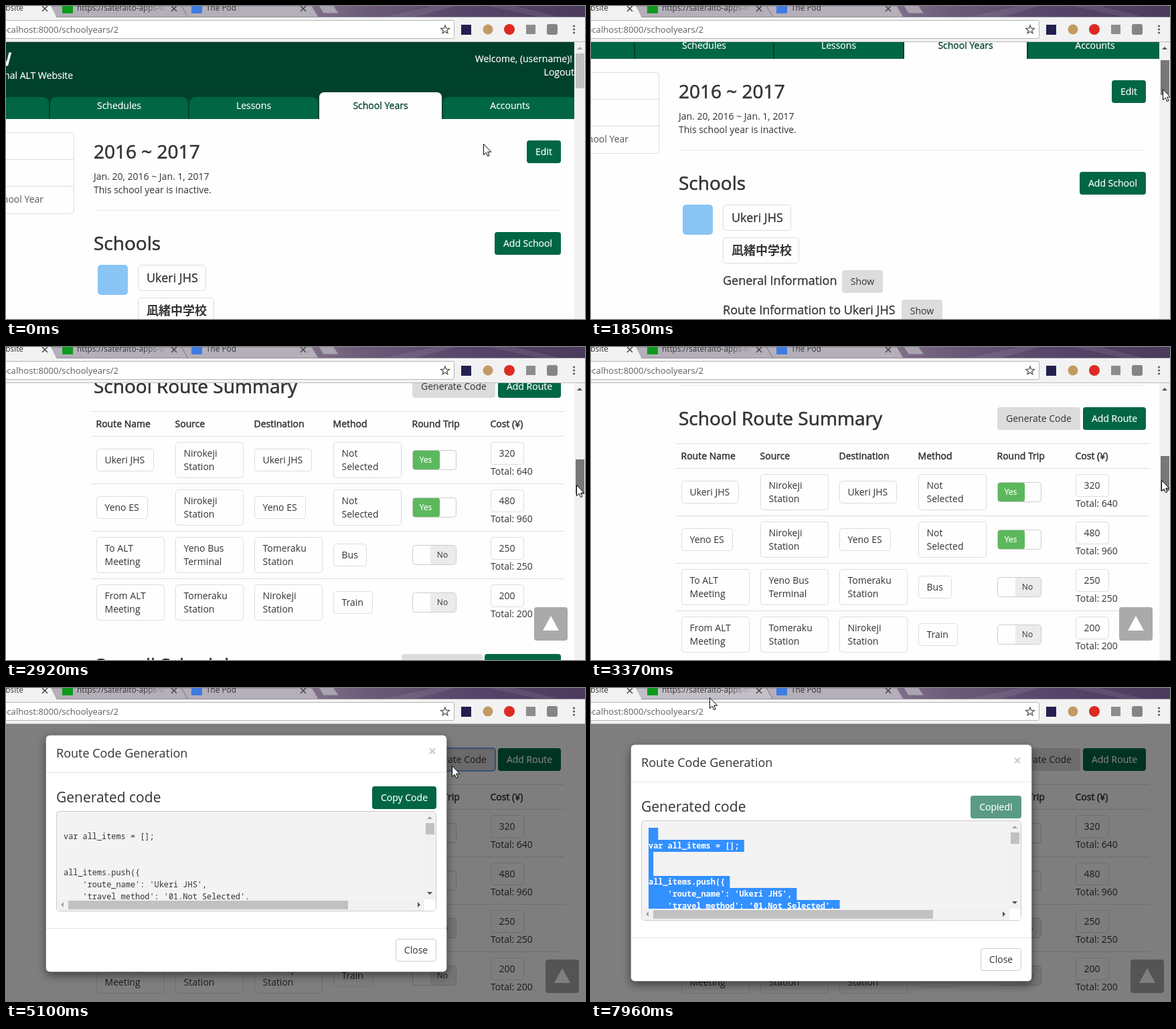
Animation of 865 by 468 pixels, one loop 8000 ms. Source, as an HTML page:

```html
<!DOCTYPE html>
<html lang="en">
<head>
<meta charset="utf-8">
<title>School year routes</title>
<style>
html, body { margin: 0; width: 100%; height: 100%; overflow: hidden; background: #fefefe; }
svg { display: block; width: 865px; height: 468px; }
text { font: 14px "Open Sans", "Noto Sans", sans-serif; fill: #333; white-space: pre; }
.mid { text-anchor: middle; }
.end { text-anchor: end; }
.h2 { font-size: 28px; stroke: #333; stroke-width: .6px; }
.h3 { font-size: 21px; }
.h4 { font-size: 18px; }
.semi { stroke: #333; stroke-width: .3px; }
.th { stroke: #333; stroke-width: .5px; }
.jp { font: bold 18px "Noto Sans CJK JP", "Noto Sans CJK", sans-serif; }
.white { fill: #fff; stroke: #fff; stroke-width: .2px; }
.small { font-size: 12px; }
.site { font-size: 34px; stroke-width: 1px; }
.ui { font-size: 11.8px; }
.url { font-size: 13.1px; fill: #5f5f5f; }
.code { font: 11.9px "Noto Sans Mono", "DejaVu Sans Mono", monospace; }
.picked .code { fill: #fff; font-weight: 600; }
.picked .sel { display: inline; }
.sel { display: none; fill: #3390ff; }
.box { fill: #fefefe; stroke: #ddd; }
.rule { stroke: #ddd; }
.green { fill: #006644; }
.grey { fill: #dcdcdc; }
.bar { fill: #c1c1c1; }
</style>
</head>
<body>
<svg id="stage" viewBox="0 0 865 468" xmlns="http://www.w3.org/2000/svg"></svg>
<script>
const LOOP = 8000;
// moments at which the screen is refreshed
const ticks = [0, 270, 410, 550, 690, 830, 980, 1120, 1270,
  1540, 1690, 1850, 1990, 2120, 2250, 2380, 2520,
  2640, 2780, 2920, 3070, 3220, 3370,
  3930, 4080, 4230, 4380, 4530, 4680, 4830,
  4980, 5100, 5250, 5390, 5530, 5670, 5810, 5950,
  6090, 6340, 6870, 7010, 7150, 7290, 7560, 7690, 7820, 7960];
const scrollKeys = [[1400, 0], [1850, 90], [1990, 250], [2250, 690], [2380, 900], [2520, 916], [3370, 826]];
const mouseKeys = [[130, 713, 206], [690, 745, 160], [1000, 848, 118], [1270, 854, 114], [1400, 854, 114],
  [1850, 854, 124], [2380, 852, 211], [2520, 852, 213], [3370, 852, 199], [3790, 852, 199],
  [4380, 668, 118], [4530, 666, 116], [5150, 666, 116], [5700, 604, 176], [5950, 600, 172],
  [6730, 600, 172], [6870, 570, 225], [7010, 500, 284], [7150, 350, 170], [7290, 238, 57],
  [7420, 238, 57], [7960, 177, 14]];
const SHADE_AT = 4746, MODAL_AT = 4901, COPY_AT = 6090;

const clamp = v => Math.max(0, Math.min(1, v));
const rect = (x, y, w, h, attrs = '') => `<rect x="${x}" y="${y}" width="${w}" height="${h}" ${attrs}/>`;
const text = (x, y, s, cls = '', attrs = '') => `<text x="${x}" y="${y}" class="${cls}" ${attrs}>${s}</text>`;
const line = (x1, x2, y, color = '#ddd') => `<path d="M${x1} ${y}H${x2}" stroke="${color}"/>`;
const frame = (x, y, w, h) => rect(x + .5, y + .5, w - 1, h - 1, 'rx="4" class="box"');
const tri = (x, y, turn, color) =>
  `<path d="M-4 2L0 -2 4 2Z" fill="${color}" transform="translate(${x} ${y}) rotate(${turn})"/>`;
const cross = (x, y) => `<path d="M${x - 4} ${y - 4}l8 8m0 -8l-8 8" stroke="#444" stroke-width="1.5"/>`;

function button(x, y, w, label, kind, id = '') {
  return rect(x, y, w, 34, `rx="4" class="${kind}" ${id && `id="${id}"`}`) +
    text(x + w / 2, y + 22, label, kind === 'green' ? 'mid white' : 'mid');
}

function navTab(x, w, label, id = '') {
  return `<path class="green" ${id && `id="${id}"`} d="M${x} 169V146q0 -10 10 -10h${w - 20}q10 0 10 10V169Z"/>` +
    text(x + w / 2, 154, label, 'mid white');
}

function header() {
  return rect(0, 54, 849, 115, 'fill="#00412b"') +
    text(8, 89, 'w', 'end white site') +
    text(100, 109, 'onal ALT Website', 'end white') +
    text(846, 84, 'Welcome, (username)!', 'end white') +
    text(849, 104, 'Logout', 'end white') +
    navTab(-130, 194, '') + navTab(66, 206, 'Schedules') + navTab(274, 192, 'Lessons') +
    navTab(653, 200, 'Accounts', 'accounts') +
    '<path d="M468 169V137q0 -8 8 -8h167q8 0 8 8V169Z" fill="#fefefe"/>' +
    text(559.5, 154, 'School Years', 'mid', 'style="fill:#00412b;stroke:#00412b;stroke-width:.3px"');
}

function school(y, name, kanji, nameW, showX) {
  return rect(137, y, 45, 45, 'rx="5" fill="#89c4f4"') +
    frame(197, y, nameW, 39) + text(210, y + 26, name, 'h4 semi') +
    frame(197, y + 49, 114, 39) + text(210, y + 75, kanji, 'jp') +
    text(197, y + 120, 'General Information', 'h4 semi') + button(375, y + 98, 61, 'Show', 'grey') +
    text(197, y + 164, 'Route Information to ' + name, 'h4 semi') + button(showX, y + 142, 61, 'Show', 'grey');
}

function yearInfo() {
  return frame(-20, 189, 122, 122) + line(0, 101, 229.5) + line(0, 101, 269.5) +
    text(56, 294, 'School Year', 'end', 'style="fill:#555"') +
    text(131, 228, '2016 ~ 2017', 'h2') + button(778, 201, 51, 'Edit', 'green') +
    text(131, 260, 'Jan. 20, 2016 ~ Jan. 1, 2017') + text(131, 280, 'This school year is inactive.') +
    line(131, 829, 305.5, '#e8e8e8') +
    text(131, 365, 'Schools', 'h2') + button(730, 338, 99, 'Add School', 'green') +
    school(387, 'Ukeri JHS', '凪緒中学校', 102, 464) +
    school(622, 'Yeno ES', '緒凪小学校', 90, 452);
}

const cols = [135, 253, 371, 489, 607, 724];
const routes = [
  ['Ukeri JHS', 'Nirokeji|Station', 'Ukeri JHS', 'Not|Selected', 1, 320],
  ['Yeno ES', 'Nirokeji|Station', 'Yeno ES', 'Not|Selected', 1, 480],
  ['To ALT|Meeting', 'Yeno Bus|Terminal', 'Tomeraku|Station', 'Bus', 0, 250],
  ['From ALT|Meeting', 'Tomeraku|Station', 'Nirokeji|Station', 'Train', 0, 200]];
const cellWidth = { 'Ukeri JHS': 86, 'Yeno ES': 77, Bus: 50, Train: 59 };

function cell(x, y, s) {
  const [a, b] = s.split('|');
  return b
    ? frame(x, y + 9, 102, 54) + text(x + 12.5, y + 31, a) + text(x + 12.5, y + 51, b)
    : frame(x, y + 19, cellWidth[s], 34) + text(x + 12.5, y + 41, a);
}

function toggle(x, y, on) {
  return rect(x + .5, y + 21.5, 65, 29, 'rx="4" fill="#fefefe" stroke="#ccc"') +
    (on ? rect(x + 1, y + 22, 40, 28, 'rx="3" fill="#5cb85c"') + text(x + 20, y + 40, 'Yes', 'mid small white')
        : rect(x + 27, y + 22, 38, 28, 'rx="3" fill="#ebebeb"') + text(x + 45, y + 40, 'No', 'mid small'));
}

function routeTable() {
  const heads = ['Route Name', 'Source', 'Destination', 'Method', 'Round Trip', 'Cost (¥)'];
  let out = line(131, 829, 57.5, '#e8e8e8') + text(131, 117, 'School Route Summary', 'h2') +
    button(607, 90, 124, 'Generate Code', 'grey', 'gen') + button(735, 90, 94, 'Add Route', 'green') +
    line(127, 834, 144.5);
  heads.forEach((s, i) => out += text(cols[i] - .5, 168, s, 'th'));
  routes.forEach((r, i) => {
    const y = 181 + 71 * i;
    out += line(127, 834, y + .5);
    for (let c = 0; c < 4; c++) out += cell(cols[c], y, r[c]);
    out += toggle(cols[4], y, r[4]) + frame(724, y + 9, 50, 34) + text(736.5, y + 31, r[5]) +
      text(724, y + 58, 'Total: ' + r[5] * (1 + r[4]));
  });
  return `<g transform="translate(0 826)">${out}` + text(131, 534, 'Overall Schedule', 'h2') +
    button(591, 507, 121, 'Download .ICS', 'grey') + button(715, 507, 114, 'Edit Schedule', 'green') + '</g>';
}

function codeBox() {
  const rows = ['', 'var all_items = [];', '', '', 'all_items.push({',
    "    'route_name': 'Ukeri JHS',", "    'travel_method': '01.Not Selected',"];
  const body = rows.map((s, i) =>
    rect(86, 209 + 18 * i, (i ? s.length + 1 : 2) * 7.14, 18, 'class="sel"') +
    text(86, 222 + 18 * i, s, 'code')).join('');
  return rect(75.5, 198.5, 567, 149, 'rx="4" fill="#f3f3f3" stroke="#ccc"') +
    `<g id="code" clip-path="url(#codeClip)">${body}</g>` +
    rect(625, 200, 17, 130, 'fill="#f1f1f1"') + rect(76, 330, 549, 17, 'fill="#f1f1f1"') +
    rect(625, 330, 17, 17, 'fill="#fff"') +
    rect(627, 216, 13, 17, 'class="bar"') + rect(93, 332, 418, 13, 'class="bar"') +
    tri(633, 208, 0, '#a3a3a3') + tri(633, 321, 180, '#505050') +
    tri(84, 338, -90, '#a3a3a3') + tri(617, 338, 90, '#505050');
}

function modal() {
  return '<g id="modal">' +
    rect(59.5, 84.5, 599, 354, 'rx="6" fill="#fff" stroke="#000" stroke-opacity=".25" filter="url(#shadow)"') +
    text(75, 118, 'Route Code Generation', 'h4') +
    text(637, 116, '×', 'mid h3', 'style="font-weight:700;fill:#000;opacity:.2"') +
    line(60, 658, 140.5, '#e5e5e5') + text(75, 185, 'Generated code', 'h3') +
    rect(547, 161, 96, 34, 'rx="4" class="green" id="copy"') + text(595, 183, 'Copy Code', 'mid white', 'id="copyText"') +
    codeBox() + line(60, 658, 373.5, '#e5e5e5') +
    rect(582.5, 389.5, 60, 33, 'rx="4" fill="#fff" stroke="#ccc"') + text(612.5, 411, 'Close', 'mid') + '</g>';
}

function browser() {
  const dots = [30, 35, 40].map(y => `<circle cx="848.5" cy="${y}" r="1.6" fill="#5a5a5a"/>`).join('');
  let star = '';
  for (let i = 0; i < 10; i++) {
    const a = Math.PI * i / 5, r = i % 2 ? 2.8 : 6.6;
    star += (i ? 'L' : 'M') + (656 + r * Math.sin(a)).toFixed(2) + ' ' + (35.5 - r * Math.cos(a)).toFixed(2);
  }
  return rect(0, 0, 865, 18, 'fill="url(#theme)"') +
    '<path d="M560 17L640 0h30L610 17ZM720 0h40l70 17h-30Z" fill="#fff" opacity=".08"/>' +
    '<path d="M262 0H457L467 17H272Z" fill="#b4afb8" stroke="#857c8c"/>' +
    '<path id="tab" d="M66 0H262L272 17H74Z" fill="#b4afb8" stroke="#857c8c"/>' +
    '<path d="M467 -1H489L497 11H474Z" fill="#aaa3b0" stroke="#7d7386"/>' +
    rect(0, 17, 865, 37, 'fill="#f2f2f2"') + line(74, 865, 16.5, '#938b99') +
    '<path d="M0 0H67L76 18H0Z" fill="#f2f2f2"/>' +
    text(26, 7, 'Website', 'ui end') + cross(58, 4) +
    rect(84, -5, 16, 16, 'fill="#0c9a1c"') +
    text(106, 7, 'https://sateraito-apps-wo', 'ui', 'style="fill:url(#fade)"') + cross(251, 4) +
    rect(277, -5, 16, 16, 'fill="#3f7be0"') + text(299, 7, 'The Pod', 'ui') + cross(444, 4) +
    rect(-5.5, 21.5, 675, 27, 'rx="2" fill="#fff" stroke="#b5b5b5"') +
    text(168, 40, 'localhost:8000/schoolyears/2', 'url end') +
    `<path d="${star}Z" fill="none" stroke="#555" stroke-width="1.3"/>` +
    rect(680, 28, 15, 15, 'fill="#23204f"') + '<circle cx="720" cy="35" r="7.5" fill="#c39a63"/>' +
    '<circle cx="752" cy="35" r="8" fill="#dd2a22"/>' + rect(777, 28, 14, 14, 'fill="#8d8d8d"') +
    rect(808, 27, 16, 16, 'rx="3" fill="#858585"') + dots + line(0, 865, 53.5, '#b9b9b9');
}

const defs = `<defs>
  <clipPath id="pageClip">${rect(0, 54, 865, 414)}</clipPath>
  <clipPath id="codeClip">${rect(76, 199, 549, 131)}</clipPath>
  <linearGradient id="theme"><stop offset=".5" stop-color="#85768f"/><stop offset=".62" stop-color="#6c5b78"/>
    <stop offset=".8" stop-color="#57456a"/><stop offset="1" stop-color="#4b3b5b"/></linearGradient>
  <linearGradient id="fade" gradientUnits="userSpaceOnUse" x1="205" x2="240" y1="0" y2="0">
    <stop stop-color="#333"/><stop offset="1" stop-color="#333" stop-opacity="0"/></linearGradient>
  <filter id="shadow" x="-10%" y="-10%" width="120%" height="125%">
    <feDropShadow dx="0" dy="5" stdDeviation="7" flood-opacity=".5"/></filter>
</defs>`;

const stage = document.getElementById('stage');
stage.innerHTML = defs + '<g clip-path="url(#pageClip)">' + rect(0, 54, 865, 414, 'fill="#fefefe"') +
  `<g id="page">${header()}${yearInfo()}${routeTable()}</g>` +
  '<g id="scrollbar">' + rect(849, 54, 16, 414, 'fill="#f1f1f1"') +
  '<path id="arrow" d="M853 65l4 -4 4 4Z"/>' + rect(851, 71, 13, 52, 'id="thumb"') + '</g>' +
  '<g id="up">' + rect(789, 389, 50, 50, 'rx="4" fill="#aaa"') + '<path d="M802 424L814 402 826 424Z" fill="#fff"/></g>' +
  rect(0, 54, 865, 414, 'id="shade"') + modal() + '</g>' + browser() +
  '<g id="mouse" fill="#fff" stroke="#000" stroke-linejoin="round">' +
  '<path id="pointer" d="M.5 .5V16.5L4.2 13.2 6.6 18.6 9 17.6 6.7 12.2H11.7Z"/>' +
  '<path id="hand" d="M-1.5 1.5q0 -2 1.7 -2t1.8 2V7q3 -1 3.2 1 2.6 -.8 2.8 1 2.3 -.3 2.3 2v4q0 3 -2 5v2.500H-1.500V20L-5.500 13.500q-1 -2 .5 -2.700 1.500 -.4 3.500 2Z"/></g>';

const el = id => document.getElementById(id);
const set = (id, attrs) => { for (const k in attrs) el(id).setAttribute(k, attrs[k]); };

// value of each track at time t, straight between keys
function track(keys, t) {
  if (t <= keys[0][0]) return keys[0].slice(1);
  const i = keys.findIndex(k => k[0] > t);
  if (i < 0) return keys[keys.length - 1].slice(1);
  const a = keys[i - 1], b = keys[i], u = (t - a[0]) / (b[0] - a[0]);
  return a.slice(1).map((v, j) => v + (b[j + 1] - v) * u);
}

function draw(time) {
  const t = ticks.filter(v => v <= time).pop();
  const [scroll] = track(scrollKeys, t), [mx, my] = track(mouseKeys, t);
  const over = (x, y, w, h) => mx >= x && mx < x + w && my >= y && my < y + h;
  const shaded = t >= SHADE_AT, copied = t >= COPY_AT;

  set('page', { transform: `translate(0 ${-Math.round(scroll)})` });
  const overTab = scroll === 0 && over(653, 136, 196, 33);
  set('accounts', { style: overTab ? 'fill:#00734f' : '' });
  set('scrollbar', { visibility: shaded ? 'hidden' : 'visible' });
  set('arrow', { fill: scroll ? '#505050' : '#a3a3a3' });
  const held = t >= 1400 && t < 3900;
  set('thumb', { y: 71 + Math.round(scroll / 9), fill: held ? '#787878' : over(849, 54, 16, 414) ? '#a8a8a8' : '#c1c1c1' });
  set('up', { opacity: clamp((scroll - 200) / 300), transform: shaded ? 'translate(17 17)' : '' });

  const overGen = over(607, 90, 124, 34) && t < MODAL_AT;
  const focus = t >= 4650 && !copied;
  set('gen', { style: (overGen || focus ? 'fill:#d5d5d5;' : '') + (focus ? 'stroke:#6ea3e8;stroke-width:2px' : '') });

  set('shade', { opacity: clamp((t - SHADE_AT) / 150) / 2 });
  const slide = 88 * (1 - clamp((t - MODAL_AT) / 300)) ** 1.69;
  set('modal', { opacity: clamp((t - MODAL_AT) / 150), transform: `translate(0 ${-Math.round(slide)})` });
  const overCopy = over(547, 161, 96, 34) && t > MODAL_AT && !copied;
  set('copy', {
    x: copied ? 567 : 547, width: copied ? 76 : 96,
    opacity: t >= 6340 ? .65 : 1, style: overCopy ? 'fill:#00573a' : ''
  });
  set('copyText', { x: copied ? 605 : 595 });
  el('copyText').textContent = copied ? 'Copied!' : 'Copy Code';
  set('code', { class: copied ? 'picked' : '' });

  set('tab', { fill: over(70, 0, 196, 17) ? '#c3bfc7' : '#b4afb8' });
  const hand = overTab || overGen || overCopy;
  set('mouse', { transform: `translate(${Math.round(mx)} ${Math.round(my)})` });
  set('pointer', { visibility: hand ? 'hidden' : 'visible' });
  set('hand', { visibility: hand ? 'visible' : 'hidden' });
}

const start = performance.now();
function loop() {
  draw((performance.now() - start) % LOOP);
  requestAnimationFrame(loop);
}
loop();
</script>
</body>
</html>
```
